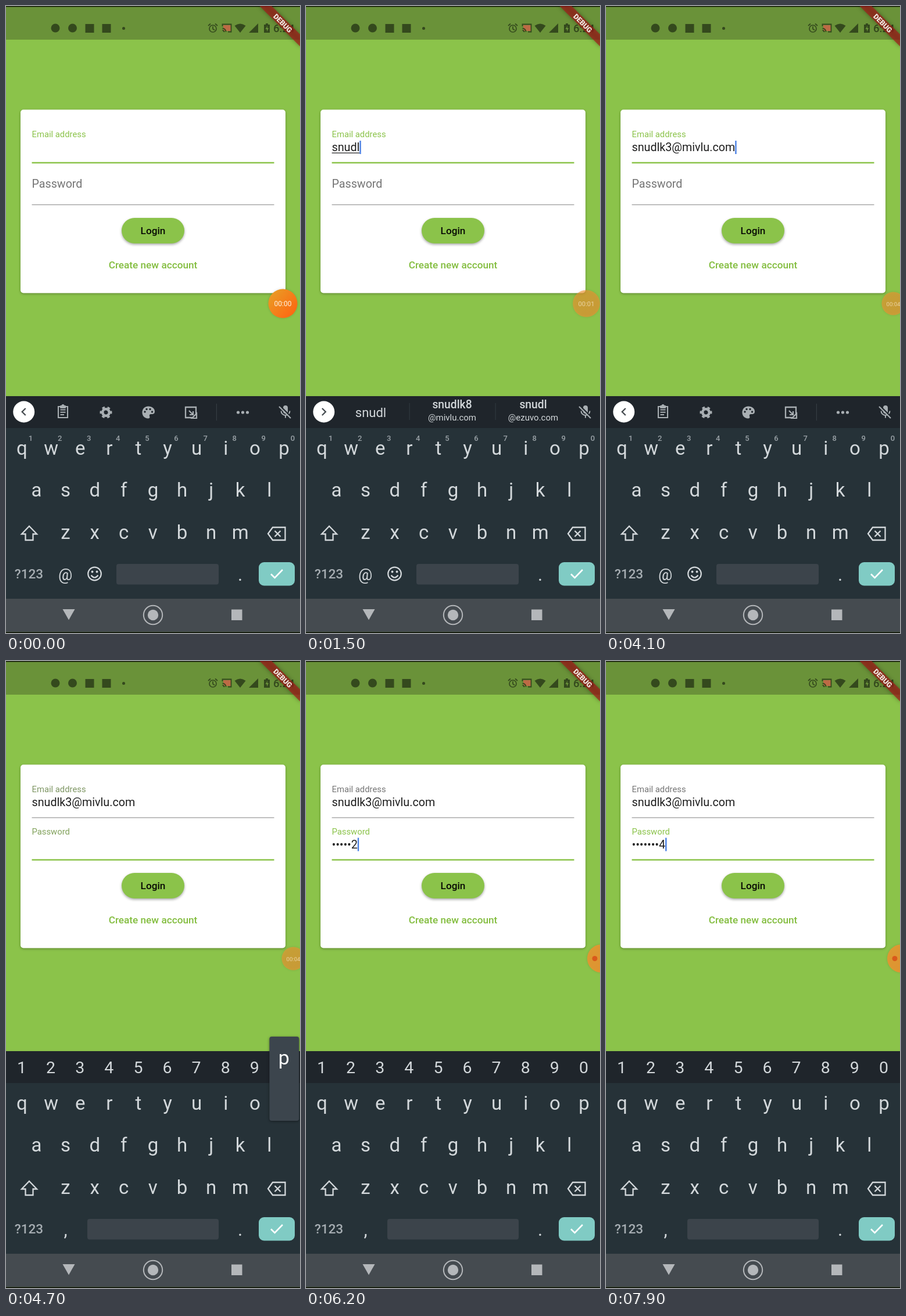
These frames come from a looping animation (506x1080 px, 8 s). An HTML page with a canvas:

```html
<!DOCTYPE html>
<html lang="en">
<head>
<meta charset="utf-8">
<title>Login form</title>
<style>
html, body { margin: 0; width: 506px; height: 1080px; overflow: hidden; background: #000; }
canvas { display: block; }
</style>
</head>
<body>
<canvas id="stage" width="506" height="1080"></canvas>
<script>
const ctx = document.getElementById('stage').getContext('2d');
const LOOP = 8000, STEP = 100;
const GREEN = [139, 195, 74], GREY = [117, 117, 117];
const KEY = '#d3d8db', ICON = '#a9afb3', STRIP = '#1f252b', DARK = '#34491d';
const PITCH = 50.1;
const ROWS = [
  { keys: '1234567890', x: 27, y: 700 },
  { keys: 'qwertyuiop', x: 27.5, y: 762 },
  { keys: 'asdfghjkl', x: 52.5, y: 834 },
  { keys: 'zxcvbnm', x: 102.5, y: 907 }
];
const USER = 'snudlk', MAIL = '@mivlu.com', PASS = 'pass1234';
const USER_TIMES = [400, 700, 1000, 1200, 1400, 2600];
const PASS_TIMES = [4800, 5000, 5200, 5500, 5900, 6100, 6600, 6700];
const PICK = 3700, FOCUS = 4500;

const ramp = (t, a, b) => Math.min(1, Math.max(0, (t - a) / (b - a)));
const lerp = (a, b, p) => a + (b - a) * p;
const mix = (a, b, p) => `rgb(${a.map((v, i) => Math.round(lerp(v, b[i], p)))})`;
const countUpTo = (times, t) => times.filter(v => v <= t).length;

function text(s, x, y, size, color, align = 'left', weight = 400) {
  ctx.font = `${weight} ${size}px Roboto, sans-serif`;
  ctx.textAlign = align;
  ctx.fillStyle = color;
  ctx.fillText(s, x, y);
  return ctx.measureText(s).width;
}

function rect(x, y, w, h, color, r = 0) {
  ctx.fillStyle = color;
  ctx.beginPath();
  ctx.roundRect(x, y, w, h, r);
  ctx.fill();
}

function disc(x, y, r, color) {
  ctx.fillStyle = color;
  ctx.beginPath();
  ctx.arc(x, y, r, 0, 7);
  ctx.fill();
}

function shadowed(blur, dy, alpha, draw) {
  ctx.save();
  ctx.shadowColor = `rgba(0,0,0,${alpha})`;
  ctx.shadowBlur = blur;
  ctx.shadowOffsetY = dy;
  draw();
  ctx.restore();
}

// Paths are centred on (x, y); a width of 0 fills them.
function icon(d, x, y, color, width = 0) {
  const path = new Path2D(d);
  ctx.save();
  ctx.translate(x, y);
  ctx.fillStyle = ctx.strokeStyle = color;
  ctx.lineWidth = width;
  if (width) ctx.stroke(path); else ctx.fill(path);
  ctx.restore();
}

function statusBar() {
  rect(0, 0, 506, 58, '#6a9239');
  rect(0, 0, 506, 1.5, '#101606');
  disc(85, 38, 7.5, DARK);
  disc(114.5, 38, 7.5, DARK);
  rect(136.5, 31, 15, 15, DARK);
  rect(165.5, 31, 15, 15, DARK);
  disc(202.5, 38.5, 2.5, DARK);

  icon('M-6 1a6 6 0 1 0 12 0a6 6 0 1 0-12 0M0-3V1.5L3 3.5M-8-4L-4-7.5M8-4L4-7.5', 356, 38, DARK, 1.7);
  rect(374, 33, 13, 10, '#bd6a45');
  icon('M-7.5-3V-6.5H7.5V6.5H2M-7.5 0.5a6 6 0 0 1 6 6M-7.5 4a3 3 0 0 1 3 3', 380, 38, DARK, 1.8);
  icon('M0 8L-9.5-4Q0-11 9.5-4Z', 403, 38, DARK);
  icon('M-8 8L8-8V8Z', 426, 38, DARK);
  icon('M-5-6H-2V-8H2V-6H5V8H-5Z', 449, 38, DARK);
  icon('M1-4L-2.5 2H0V6L3 0H.5Z', 449, 38, '#6a9239');
  text('6:24', 460, 45, 18.5, DARK, 'left', 500);
}

function banner() {
  ctx.save();
  ctx.translate(506, 0);
  ctx.rotate(Math.PI / 4);
  shadowed(7, 0, .5, () => rect(-50, 34.5, 100, 14.7, 'rgba(165,24,24,.68)'));
  text('DEBUG', 0, 46.2, 12.4, '#f2e8e4', 'center', 900);
  ctx.restore();
}

function line(y, focused) {
  rect(44.5, focused ? y - 1.3 : y - .7, 417, focused ? 2.6 : 1.3, focused ? mix(GREEN, GREEN, 0) : '#9b9b9b');
}

function cursor(x, y, t, times) {
  const last = Math.max(...times.filter(v => v <= t));
  const phase = (t - last) % 1200;
  ctx.globalAlpha = phase < 500 ? 1 : phase < 600 || phase >= 1100 ? .5 : 0;
  rect(x, y, 2.4, 23, '#4a80e4');
  ctx.globalAlpha = 1;
}

function form(t, typed) {
  shadowed(4, 1.5, .3, () => rect(25, 178.5, 456, 316, '#fff', 5));
  const onPass = t >= FOCUS;
  const tint = ramp(t, FOCUS, FOCUS + 350), float = ramp(t, FOCUS, FOCUS + 200);

  text('Email address', 44.5, 226, 14.8, mix(GREEN, GREY, tint));
  const picked = t >= PICK;
  const mail = picked ? USER + '3' + MAIL : typed;
  const mailWidth = text(mail, 44.5, 250, 19.7, '#1e1e1e');
  if (!picked && typed) rect(44.5, 252.5, mailWidth, 1.2, '#1e1e1e');
  line(270, !onPass);

  text('Password', 44.5, lerp(313, 299, float), lerp(19.7, 14.8, float), mix(GREY, GREEN, tint));
  const n = countUpTo(PASS_TIMES, t);
  const secret = n ? '•'.repeat(n - 1) + PASS[n - 1] : '';
  const passWidth = text(secret, 44.5, 323, 19.7, '#1e1e1e');
  line(342.5, onPass);

  if (!onPass) cursor(44.5 + mailWidth, 232, t, [-1000, ...USER_TIMES, PICK]);
  else if (n) cursor(44.5 + passWidth, 304.5, t, PASS_TIMES);

  shadowed(4, 2, .35, () => rect(199, 365, 108, 44, '#8bc34a', 22));
  text('Login', 253, 393, 17.2, '#080a04', 'center', 500);
  text('Create new account', 253, 452, 17.2, '#83bd3f', 'center', 500);
}

function gear(x, y) {
  ctx.strokeStyle = ICON;
  const ring = (r, width, dash) => {
    ctx.lineWidth = width;
    ctx.setLineDash(dash);
    ctx.beginPath();
    ctx.arc(x, y, r, -.26, Math.PI * 2 - .26);
    ctx.stroke();
  };
  const tooth = 9 * Math.PI / 6;
  ring(5.8, 4.6, []);
  ring(9, 3, [tooth, tooth]);
  ctx.setLineDash([]);
}

function toolbar() {
  icon('M-8-9H8V10H-8ZM-4.5-3.5H4.5M-4.5.8H4.5M-4.5 5H2', 98, 699, ICON, 2.1);
  rect(93, 688, 10, 5, ICON, 1);
  disc(98, 688.5, 2.5, ICON);
  gear(172, 700);
  icon('M0-10.5C-14-10.5-14 10.5 0 10.5Q3.5 10 2 6.5Q1 3 4.5 3H7Q11 2.5 11-1.5C11-7 6-10.5 0-10.5', 245, 700, ICON);
  for (const [dx, dy] of [[-6, -1], [-3, -5.5], [3, -5.5], [6.5, -1]]) disc(245 + dx, 700 + dy, 1.7, STRIP);
  icon('M2 9H-9V-9H9V2', 318, 700, ICON, 2.3);
  icon('M-3-3L4 4M4-2V4H-2M10 2V10H2Z', 318, 700, ICON, 2.2);
  rect(361.8, 685, 1.2, 29, '#353c42');
  for (const dx of [-8, 0, 8]) disc(407.5 + dx, 700, 2.6, ICON);
}

function suggestions(typed) {
  text(typed, 111.5, 708, 22, KEY, 'center');
  for (const x of [177.5, 325.5]) rect(x, 684, 1.2, 29, '#30383e');
  const long = typed === USER;
  const pairs = [
    [251.5, USER + '8', MAIL],
    [391, long ? USER + '3' : 'snudl', long ? MAIL : '@ezuvo.com']
  ];
  for (const [x, name, host] of pairs) {
    text(name, x, 693, 19.3, KEY, 'center', 500);
    text(host, x, 714, 15, KEY, 'center');
  }
}

function keyboard(t, typed) {
  const onPass = t >= FOCUS;
  rect(0, 672, 506, 349, '#263238');
  rect(0, 672, 506, 55, STRIP);
  if (!onPass) {
    const suggest = typed && t < PICK;
    if (suggest) suggestions(typed); else toolbar();
    disc(30.7, 699, 18.5, '#fff');
    icon(suggest ? 'M-3-6L3 0L-3 6' : 'M3-6L-3 0L3 6', 30.7, 699, '#454b50', 2.3);
    icon('M-4-6a4 4 0 0 1 8 0V0a4 4 0 0 1-8 0Z', 481, 698, ICON);
    icon('M-7.5-1a7.5 7.5 0 0 0 15 0M0 6.5V11', 481, 698.5, ICON, 2);
    icon('M-11-9L9 11', 482.5, 697.5, STRIP, 2.4);
    icon('M-11-9L9 11', 481, 699, ICON, 2.1);
  }

  ROWS.forEach(({ keys, x, y }, row) => {
    if (!row && !onPass) return;
    [...keys].forEach((key, i) => {
      text(key, x + i * PITCH, y + (row ? 11 : 10), row ? 33 : 28.5, KEY, 'center');
      if (row === 1 && !onPass) text((i + 1) % 10, x + i * PITCH + 15, 749, 13, '#9aa2a7', 'center', 500);
    });
  });

  icon('M0-12L13 1.5H6.5V12H-6.5V1.5H-13Z', 40, 908, KEY, 2.3);
  icon('M-15 0L-7-11H14.5V11H-7ZM-3.5-5L6.5 5M6.5-5L-3.5 5', 466, 909, KEY, 2.3);
  text('?123', 39.5, 986, 22.5, '#a6adb2', 'center', 500);
  text('.', 403, 990, 31, KEY, 'center');
  if (onPass) {
    text(',', 102.5, 990, 31, KEY, 'center');
  } else {
    text('@', 102, 989, 27, KEY, 'center');
    icon('M-11.3 0a11.3 11.3 0 1 0 22.6 0a11.3 11.3 0 1 0-22.6 0M-6 2.5Q0 10.5 6 2.5', 152.5, 978, KEY, 2.2);
    disc(148.5, 974.5, 1.9, KEY);
    disc(156.5, 974.5, 1.9, KEY);
  }
  const left = onPass ? 140 : 190;
  rect(left, 961, 366 - left, 35.5, '#3c444b', 4);
  rect(435, 958, 62, 40.5, '#80cbc4', 9);
  icon('M-10 .5L-3.5 7L10-7', 466, 978, '#fff', 2.6);

  rect(0, 1021, 506, 57.5, '#454b50');
  rect(0, 1078.5, 506, 1.5, '#000');
  icon('M-10.5-9H10.5L0 9.5Z', 108, 1048, '#b4b7ba');
  disc(253, 1049, 9.2, '#b4b7ba');
  icon('M-16.2 0a16.2 16.2 0 1 0 32.4 0a16.2 16.2 0 1 0-32.4 0', 253, 1049, '#b4b7ba', 2);
  rect(388, 1039.5, 18.5, 18.5, '#b4b7ba');
}

function popups(t) {
  const show = (key, time) => {
    if (t < time - 100 || t >= time + 100) return;
    const row = ROWS.find(r => r.keys.includes(key));
    const x = row.x + row.keys.indexOf(key) * PITCH;
    shadowed(4, 1, .45, () => rect(x - 25, row.y - 115, 51, 145, '#3c454d', 4));
    text(key, x, row.y - 67, 34, '#fff', 'center');
  };
  USER_TIMES.forEach((time, i) => show(USER[i], time));
  PASS_TIMES.forEach((time, i) => show(PASS[i], time));
}

function badge(t) {
  const slide = ramp(t, 1250, 2000), dock = ramp(t, 5100, 5300);
  const x = lerp(lerp(476.5, 494.5, slide), 508, dock);
  const r = lerp(lerp(25, 20, slide), 24, dock);
  const fill = ctx.createLinearGradient(x - r, 490, x + r, 534);
  const fade = ramp(t, 1200, 1500);
  fill.addColorStop(0, mix([232, 160, 38], [240, 150, 46], fade));
  fill.addColorStop(1, mix([255, 98, 16], [247, 138, 46], fade));
  ctx.globalAlpha = lerp(lerp(1, .62, fade), .82, dock);
  shadowed(4, 0, .15, () => disc(x, 512.5, r, fill));
  if (dock < .5) {
    const sec = Math.max(0, Math.floor((t - 100) / 1000));
    text('00:0' + sec, x, 517, lerp(12, 9.6, slide), '#fff3e2', 'center');
  } else {
    ctx.globalAlpha = 1;
    disc(497, 512.5, 4.5, '#d9591b');
  }
  ctx.globalAlpha = 1;
}

function draw(now) {
  const t = Math.floor(now % LOOP / STEP) * STEP;
  const typed = USER.slice(0, countUpTo(USER_TIMES, t));
  rect(0, 0, 506, 1080, '#8bc34a');
  statusBar();
  form(t, typed);
  keyboard(t, typed);
  popups(t);
  badge(t);
  banner();
}

const start = performance.now();
function loop() {
  draw(performance.now() - start);
  requestAnimationFrame(loop);
}
loop();
</script>
</body>
</html>
```
